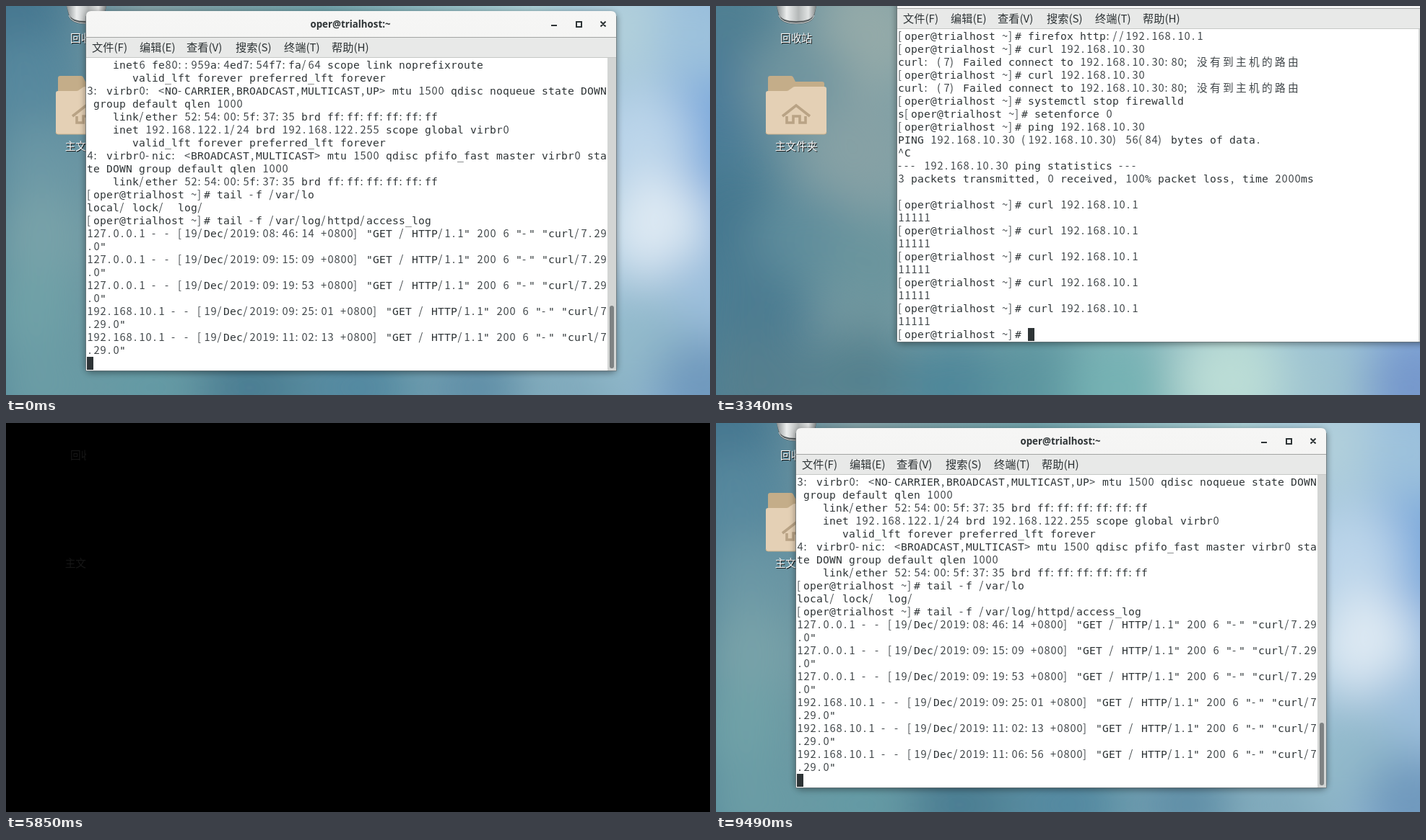
Recreate the animation shown at these times as an HTML page. Size 975 px wide and 540 px high, loop 9.8 s.

```html
<!DOCTYPE html>
<html lang="zh">
<head>
<meta charset="utf-8">
<title>Terminal session</title>
<style>
  html, body { margin: 0; width: 100%; height: 100%; overflow: hidden; background: #000; }
  svg { display: block; width: 975px; height: 540px; }
  .letter { font: 14.67px "DejaVu Sans Mono", monospace; fill: #2e3436; }
  .thin { font: 300 14.67px "Noto Sans CJK SC", "Noto Sans CJK", sans-serif; fill: #41474a; }
  .menu { font: 300 15.2px "Noto Sans CJK SC", "Noto Sans CJK", sans-serif; fill: #2e3436; }
  .title { font: bold 13.3px "Noto Sans", "Open Sans", sans-serif; fill: #2e3436; text-anchor: middle; }
  .label { font: 14.67px "Noto Sans CJK SC", "Noto Sans CJK", sans-serif; text-anchor: middle; fill: #fff; }
  .shade { fill: #111; }
  .ghost { fill: #161616; font-weight: 300; }
</style>
</head>
<body>
<svg id="stage" viewBox="0 0 975 540" xmlns="http://www.w3.org/2000/svg">
  <defs>
    <linearGradient id="sky">
      <stop offset="0" stop-color="#4b7f95"/>
      <stop offset=".2" stop-color="#819fa5"/>
      <stop offset=".45" stop-color="#6fa0a8"/>
      <stop offset=".75" stop-color="#a9cdd3"/>
      <stop offset="1" stop-color="#8bb1dc"/>
    </linearGradient>
    <linearGradient id="bar" x2="0" y2="1">
      <stop offset="0" stop-color="#f6f6f5"/>
      <stop offset="1" stop-color="#e4e4e2"/>
    </linearGradient>
    <linearGradient id="metal">
      <stop offset="0" stop-color="#8c9192"/>
      <stop offset=".25" stop-color="#eceeee"/>
      <stop offset=".55" stop-color="#b4b8b8"/>
      <stop offset=".8" stop-color="#e2e4e4"/>
      <stop offset="1" stop-color="#7d8283"/>
    </linearGradient>
    <filter id="soft" filterUnits="userSpaceOnUse" x="-200" y="-200" width="1375" height="940">
      <feGaussianBlur stdDeviation="32"/>
    </filter>
    <filter id="shadow" x="-10%" y="-10%" width="120%" height="120%">
      <feGaussianBlur stdDeviation="5"/>
    </filter>
    <clipPath id="left"><rect width="111" height="540"/></clipPath>
  </defs>
  <rect width="975" height="540" fill="url(#sky)"/>
  <g id="walls"></g>
  <g id="icons">
    <path d="M84 0L87 14Q90 25 111 25Q133 25 136 14L139 0Z" fill="#565c5e"/>
    <path d="M84 0L87 11Q90 21 111 21Q133 21 136 11L139 0Z" fill="url(#metal)"/>
    <path d="M87 13Q90 24 111 24Q133 24 136 13" fill="none" stroke="#d9dcdc"/>
    <path d="M72 100q0-3 3-3H104q2 0 3 2l3 6H147q3 0 3 3V130H72Z" fill="#c4ad89"/>
    <path d="M69 121q0-3 3-3H98q2 0 4-2l3-2q2-2 4-2H150q3 0 3 3V175q0 3-3 3H72q-3 0-3-3Z" fill="#e4d0b5"/>
    <path d="M69 175q0 3 3 3H150q3 0 3-3" fill="none" stroke="#c9b08c"/>
    <path d="M92 153L111 138L130 153M98 153V162H107V153H116V162H124V153" fill="none" stroke="#b9a385" stroke-width="3.6"/>
  </g>
</svg>
<script>
const NS = 'http://www.w3.org/2000/svg';
const stage = document.getElementById('stage');
const LOOP = 9800, CELL = 9, ROW = 18, COLS = 80;

function add(parent, tag, attrs = {}, text) {
  const el = document.createElementNS(NS, tag);
  for (const key in attrs) el.setAttribute(key, attrs[key]);
  if (text) el.textContent = text;
  parent.appendChild(el);
  return el;
}
const rect = (parent, x, y, width, height, fill, more) =>
  add(parent, 'rect', { x, y, width, height, fill, ...more });

// Wallpaper: soft patches of colour, one set per desktop
function makeWall(patches) {
  const wall = add(document.getElementById('walls'), 'g', { filter: 'url(#soft)' });
  for (const [cx, cy, fill] of patches) add(wall, 'circle', { cx, cy, r: 75, fill });
  return wall;
}
const logWall = makeWall([
  [10, 10, '#44768f'], [30, 110, '#57889e'], [50, 230, '#6a97a5'], [50, 330, '#78a2a9'],
  [40, 430, '#70a1a7'], [50, 530, '#6a9ca5'], [200, 530, '#639aa4'], [340, 530, '#4c7e93'],
  [490, 530, '#5388a0'], [650, 530, '#608fa7'], [800, 530, '#7fa9bb'],
  [870, 30, '#b2d0db'], [970, 40, '#9cc1dc'], [975, 180, '#76a5da'], [880, 190, '#bcd5ea'],
  [900, 310, '#dde9f3'], [970, 410, '#9dbfdd'], [880, 470, '#93bacb'], [970, 530, '#7099bd']
]);
const shellWall = makeWall([
  [10, 30, '#4f7f92'], [0, 130, '#4a7a98'], [210, 40, '#94aaa9'], [110, 110, '#6f949f'],
  [20, 300, '#44778f'], [195, 200, '#86a1a5'], [120, 330, '#5e8d9c'], [220, 360, '#6b949d'],
  [50, 430, '#4b7c91'], [60, 530, '#547f8e'], [200, 520, '#54818e'], [330, 530, '#50879a'],
  [450, 530, '#5b949f'], [560, 530, '#76b2b4'], [850, 530, '#9fc4d0'], [710, 520, '#bbddd6'],
  [970, 530, '#7698cc']
]);

const LABELS = [['回收站', 50], ['主文件夹', 200]];
function labels(parent, cls, dx = 0, dy = 0) {
  for (const [text, y] of LABELS) add(parent, 'text', { class: 'label ' + cls, x: 111 + dx, y: y + dy }, text);
}
labels(stage, 'shade', 1, 1);
labels(stage, '');

// Terminal text: letters and thin signs share one cell grid
const inset = ch => /[.,]/.test(ch) ? 2 : /[:\/\d]/.test(ch) ? .5 : 0;
function drawLine(parent, text, x, y) {
  const runs = { letter: ['', []], thin: ['', []] };
  let col = 0;
  for (const ch of text) {
    if (ch !== ' ') {
      const run = runs[/[A-Za-z_"@#%]/.test(ch) ? 'letter' : 'thin'];
      run[0] += ch;
      run[1].push(x + col * CELL + inset(ch));
    }
    col += ch > '\u2fff' ? 2 : 1;
  }
  for (const cls in runs) {
    const [chars, xs] = runs[cls];
    if (chars) add(parent, 'text', { class: cls, x: xs.join(' '), y }, chars);
  }
}
function drawPage(parent, lines) {
  const page = add(parent, 'g');
  lines.forEach((line, i) => drawLine(page, line, 112, 87 + i * ROW));
  return page;
}

const USER = 'oper@trialhost';
const prompt = cmd => `[${USER} ~]# ${cmd}`;

function makeWindow(dx, dy) {
  const win = add(stage, 'g', { transform: `translate(${dx} ${dy})` });
  rect(win, 110, 9, 736, 500, '#000', { rx: 8, opacity: .4, filter: 'url(#shadow)' });
  add(win, 'path', { d: 'M111 506V14q0-7 7-7H838q7 0 7 7V506Z', fill: 'url(#bar)' });
  rect(win, 111, 43, 734, 1, '#a3a5a3');
  rect(win, 111, 44, 734, 27, '#e8e9e8');
  rect(win, 111, 71, 734, 1, '#c6c8c6');
  rect(win, 111, 72, 722, 434, '#fff');
  rect(win, 833, 72, 12, 434, '#d3d5d4');
  rect(win, 836, 416, 6, 87, '#7e8283', { rx: 3 });
  add(win, 'path', { d: 'M110.5 506V14M845.5 14V506.5H110.5', fill: 'none', stroke: '#6d7678', opacity: .7 });
  add(win, 'text', { class: 'title', x: 477, y: 30 }, USER + ':~');
  add(win, 'path', {
    d: 'M755 27H763M790 22H797V29H790ZM823.5 21.5L830.5 28.5M830.5 21.5L823.5 28.5',
    fill: 'none', stroke: '#2e3436', 'stroke-width': 2
  });
  [['文件(F)', 119], ['编辑(E)', 185], ['查看(V)', 250], ['搜索(S)', 318], ['终端(T)', 385], ['帮助(H)', 451]]
    .forEach(([text, x]) => add(win, 'text', { class: 'menu', x, y: 63 }, text));
  return win;
}
const makeCursor = win => rect(win, 112, 487, CELL, ROW, '#2e3436');

// Log viewer
const wrap = line => line.length > COLS ? [line.slice(0, COLS), line.slice(COLS)] : [line];
const hit = (ip, time) => `${ip} - - [19/Dec/2019:${time} +0800] "GET / HTTP/1.1" 200 6 "-" "curl/7.29.0"`;
const lft = '       valid_lft forever preferred_lft forever';
const ether = '    link/ether 52:54:00:5f:37:35 brd ff:ff:ff:ff:ff:ff';
const local = '127.0.0.1', remote = '192.168.10.1';
const logLines = [
  '    inet6 fe80::959a:4ed7:54f7:fa/64 scope link noprefixroute',
  lft,
  '3: virbr0: <NO-CARRIER,BROADCAST,MULTICAST,UP> mtu 1500 qdisc noqueue state DOWN group default qlen 1000',
  ether,
  '    inet 192.168.122.1/24 brd 192.168.122.255 scope global virbr0',
  lft,
  '4: virbr0-nic: <BROADCAST,MULTICAST> mtu 1500 qdisc pfifo_fast master virbr0 state DOWN group default qlen 1000',
  ether,
  prompt('tail -f /var/lo'),
  'local/ lock/  log/',
  prompt('tail -f /var/log/httpd/access_log'),
  hit(local, '08:46:14'), hit(local, '09:15:09'), hit(local, '09:19:53'),
  hit(remote, '09:25:01'), hit(remote, '11:02:13'), hit(remote, '11:06:56')
].flatMap(wrap);

// Client shell
const get = [prompt('curl 192.168.10.1'), '11111'];
const fail = [prompt('curl 192.168.10.30'), 'curl: (7) Failed connect to 192.168.10.30:80; 没有到主机的路由'];
const browse = prompt('firefox http://192.168.10.1');
const shellLines = [
  'rtt min/avg/max/mdev = 0.625/0.625/0.625/0.000 ms',
  browse, browse, ...fail, ...fail,
  prompt('systemctl stop firewalld'),
  's' + prompt('setenforce 0'),
  prompt('ping 192.168.10.30'),
  'PING 192.168.10.30 (192.168.10.30) 56(84) bytes of data.',
  '^C',
  '--- 192.168.10.30 ping statistics ---',
  '3 packets transmitted, 0 received, 100% packet loss, time 2000ms',
  '',
  ...get, ...get, ...get, ...get, ...get
];

const logWin = makeWindow(0, 0);
const logPages = [0, 2].map(n => drawPage(logWin, logLines.slice(n, n + 23)));
const logCursor = makeCursor(logWin);

const shellWin = makeWindow(140, -40);
const shellPages = [
  [...shellLines.slice(0, 23), prompt('')],
  [...shellLines.slice(0, 23), get[0]],
  [...shellLines.slice(2), prompt('')]
].map(lines => drawPage(shellWin, lines));
const shellCursor = makeCursor(shellWin);

const dark = add(stage, 'g');
rect(dark, 0, 0, 975, 540, '#000');
labels(add(dark, 'g', { 'clip-path': 'url(#left)' }), 'ghost');

// [start ms, scene, page, cursor column or -1]
const steps = [
  [0, 'log', 0, 0], [1250, 'dark'],
  [1310, 'shell', 0, 20], [2720, 'shell', 1, 37], [3340, 'shell', 2, 20],
  [3930, 'shell', 2, -1], [4530, 'shell', 2, 20], [4750, 'dark'],
  [6350, 'log', 1, -1], [6950, 'log', 1, 0], [7550, 'log', 1, -1],
  [8130, 'log', 1, 0], [8700, 'log', 1, -1], [9290, 'log', 1, 0]
];
const show = (el, on) => { el.style.display = on ? '' : 'none'; };
const scenes = {
  log: { layers: [logWall, logWin], pages: logPages, cursor: logCursor },
  shell: { layers: [shellWall, shellWin], pages: shellPages, cursor: shellCursor },
  dark: { layers: [dark], pages: [] }
};

let current;
function render(time) {
  const step = steps.findLast(s => s[0] <= time);
  if (step === current) return;
  current = step;
  const [, name, page, col] = step;
  for (const key in scenes) scenes[key].layers.forEach(el => show(el, key === name));
  const { pages, cursor } = scenes[name];
  pages.forEach((el, i) => show(el, i === page));
  if (cursor) {
    show(cursor, col >= 0);
    cursor.setAttribute('x', 112 + Math.max(col, 0) * CELL);
  }
}

const start = performance.now();
function tick() {
  render((performance.now() - start) % LOOP);
  requestAnimationFrame(tick);
}
tick();
</script>
</body>
</html>
```
